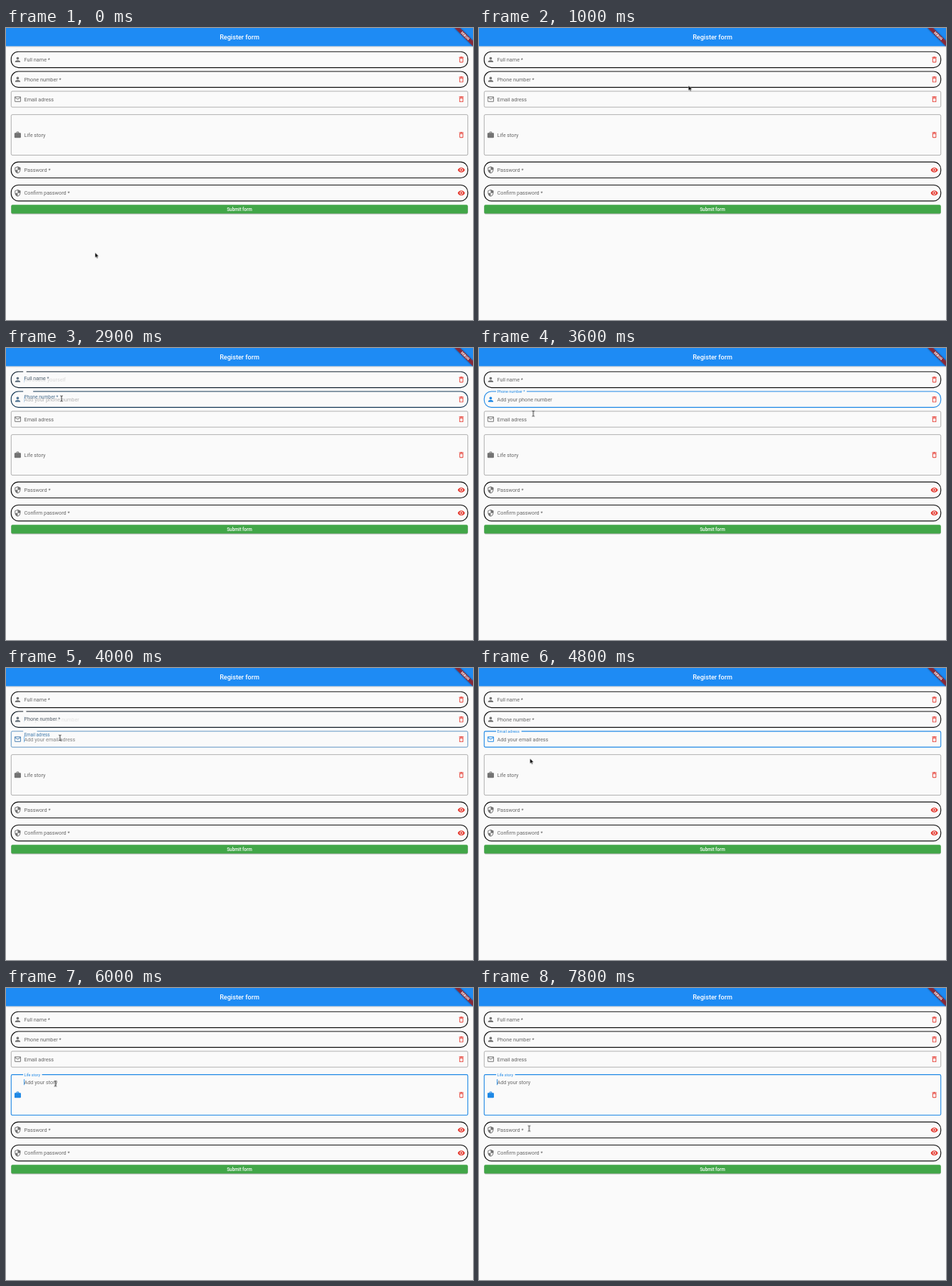
Animation, 656 px wide and 410 px high, one loop 8 s. Source, as an HTML page:

```html
<!DOCTYPE html>
<html lang="en">
<head>
<meta charset="utf-8">
<title>Register form</title>
<style>
@property --f { syntax: '<number>'; inherits: true; initial-value: 0; }
@property --arrow { syntax: '<number>'; inherits: true; initial-value: 1; }

:root { --blue: #1e88e5; --loop: 8s; }
html, body { margin: 0; width: 100%; height: 100%; overflow: hidden; background: #fafafa; }
svg { display: block; width: 100%; height: 100%; }
text { font-family: Roboto, Arial, sans-serif; font-size: 16px; }

.bar { fill: #1e8bf4; filter: drop-shadow(0 1px 2px rgba(0, 0, 0, .25)); }
.title { font-size: 20px; font-weight: 500; fill: #fff; }
.button { fill: #41a648; filter: drop-shadow(0 2px 1.5px rgba(0, 0, 0, .3)); }
.action { font-size: 14px; font-weight: 500; fill: #fff; }
.mid { text-anchor: middle; }
.ribbon-shadow { fill: rgba(0, 0, 0, .5); filter: blur(2.5px); }
.ribbon { fill: rgba(183, 28, 28, .7); }
.ribbon-text { font-size: 10.2px; font-weight: 900; fill: #fff; }

/* --f runs from 0 (resting) to 1 (focused) */
.field { animation: var(--loop) cubic-bezier(.4, 0, .2, 1) infinite; }
.name { animation-name: name; }
.phone { animation-name: phone; }
.email { animation-name: email; }
.story { animation-name: story; }

.box {
  fill: none;
  stroke: color-mix(in srgb, var(--blue) calc(var(--f) * 100%), var(--line));
  stroke-width: calc(var(--w) + var(--f) * (2.4px - var(--w)));
}
.notch { fill: #fafafa; transform: scaleX(var(--f)); }
.icon { fill: color-mix(in srgb, var(--blue) calc(var(--f) * 100%), #737373); }
.tool { fill: #e5392f; }
.label {
  fill: color-mix(in srgb, var(--blue) calc(var(--f) * 100%), #666);
  transform: translateY(calc(var(--f) * var(--rise))) scale(calc(1 - .25 * var(--f)));
}
.hint { fill: #6b6b6b; opacity: calc(var(--f) * 1.5); }
.caret { fill: var(--blue); animation: blink 1s ease-out var(--phase) infinite; }

@keyframes blink { 0%, 75%, 100% { opacity: 1; } 25%, 50% { opacity: 0; } }
@keyframes name { 0%, 17.25% { --f: 0; } 19.75%, 34.84% { --f: 1; } 37.34%, 100% { --f: 0; } }
@keyframes phone { 0%, 35.55% { --f: 0; } 38.05%, 48.43% { --f: 1; } 50.93%, 100% { --f: 0; } }
@keyframes email { 0%, 49.09% { --f: 0; } 51.59%, 66.63% { --f: 1; } 69.13%, 100% { --f: 0; } }
@keyframes story { 0%, 67.38% { --f: 0; } 69.88%, 100% { --f: 1; } }

.pointer {
  animation: move var(--loop) linear infinite, shape var(--loop) step-end infinite;
}
.arrow { stroke: #fff; stroke-width: 1; opacity: var(--arrow); }
.beam { fill: none; stroke: #222; stroke-width: .9; opacity: calc(1 - var(--arrow)); }

@keyframes move {
  0% { transform: translate(125.4px, 317px); }
  1.25% { transform: translate(104px, 153px); }
  2.5%, 5% { transform: translate(86px, 44px); }
  7.5% { transform: translate(500px, 60px); }
  9.5% { transform: translate(639px, 139px); }
  12% { transform: translate(350px, 90px); }
  14.5%, 24.5% { transform: translate(78px, 45px); }
  30%, 41.5% { transform: translate(78px, 71px); }
  46%, 57.5% { transform: translate(75.8px, 98px); }
  60% { transform: translate(71.6px, 127px); }
  65%, 74.5% { transform: translate(69.5px, 133.5px); }
  78.5%, 82% { transform: translate(69.5px, 139px); }
  92.5%, 100% { transform: translate(70.5px, 197.3px); }
}
@keyframes shape {
  0%, 6%, 58.5%, 86.5% { --arrow: 1; }
  2.4%, 14%, 62%, 89%, 100% { --arrow: 0; }
}
</style>
</head>
<body>
<svg viewBox="0 0 1440 900">
  <rect class="bar" width="1440" height="56"/>
  <text class="title mid" x="720" y="35.5">Register form</text>
  <g id="form"></g>
  <rect class="button" x="16" y="545" width="1408" height="27" rx="4"/>
  <text class="action mid" x="720" y="563.5">Submit form</text>
  <g transform="translate(1440 0) rotate(45)">
    <rect class="ribbon-shadow" x="-40" y="28" width="80" height="12"/>
    <rect class="ribbon" x="-40" y="28" width="80" height="12"/>
    <text class="ribbon-text mid" y="37.6">DEBUG</text>
  </g>
  <g transform="scale(2.19512)">
    <g class="pointer">
      <path class="arrow" transform="scale(.4556)" d="M0 0V16l3.7-3.6 2.3 5.5 2.6-1.1-2.3-5.4h5z"/>
      <path class="beam" d="M-1.7-3.9Q0-3.9 0-2.9V2.9Q0 3.9-1.7 3.9M1.7-3.9Q0-3.9 0-2.9M0 2.9Q0 3.9 1.7 3.9"/>
    </g>
  </g>
</svg>
<script>
const icons = {
  person: 'M12 12c2.21 0 4-1.79 4-4s-1.79-4-4-4-4 1.79-4 4 1.79 4 4 4zm0 2c-2.67 0-8 1.34-8 4v2h16v-2c0-2.66-5.33-4-8-4z',
  mail: 'M22 6c0-1.1-.9-2-2-2H4c-1.1 0-2 .9-2 2v12c0 1.1.9 2 2 2h16c1.1 0 2-.9 2-2V6zm-2 0l-8 5-8-5h16zm0 12H4V8l8 5 8-5v10z',
  work: 'M20 6h-4V4c0-1.11-.89-2-2-2h-4c-1.11 0-2 .89-2 2v2H4c-1.11 0-1.99.89-1.99 2L2 19c0 1.11.89 2 2 2h16c1.11 0 2-.89 2-2V8c0-1.11-.89-2-2-2zm-6 0h-4V4h4v2z',
  shield: 'M12 1L3 5v6c0 5.55 3.84 10.74 9 12 5.16-1.26 9-6.45 9-12V5l-9-4zm0 10.99h7c-.53 4.12-3.28 7.79-7 8.94V12H5V6.3l7-3.11v8.8z',
  bin: 'M6 19c0 1.1.9 2 2 2h8c1.1 0 2-.9 2-2V7H6v12zM8 9h8v10H8V9zm7.5-5l-1-1h-5l-1 1H5v2h14V4z',
  eye: 'M12 4.5C7 4.5 2.73 7.61 1 12c1.73 4.39 6 7.5 11 7.5s9.27-3.11 11-7.5c-1.73-4.39-6-7.5-11-7.5zM12 17c-2.76 0-5-2.24-5-5s2.24-5 5-5 5 2.24 5 5-2.24 5-5 5zm0-8c-1.66 0-3 1.34-3 3s1.34 3 3 3 3-1.34 3-3-1.34-3-3-3z'
};

const fields = [
  { id: 'name', top: 73, label: 'Full name *', hint: 'Introduce yourself', icon: 'person', round: true, notch: 66, phase: 900 },
  { id: 'phone', top: 134, label: 'Phone number *', hint: 'Add your phone number', icon: 'person', round: true, notch: 94, phase: 300 },
  { id: 'email', top: 195, label: 'Email adress', hint: 'Add your email adress', icon: 'mail', notch: 78, phase: 350 },
  { id: 'story', top: 267, height: 125, label: 'Life story', hint: 'Add your story', icon: 'work', notch: 58, phase: 990 },
  { id: 'secret', top: 413, label: 'Password *', icon: 'shield', tool: 'eye', round: true },
  { id: 'repeat', top: 484, label: 'Confirm password *', icon: 'shield', tool: 'eye', round: true }
];

const glyph = (name, cls, x, y) =>
  `<path class="${cls}" transform="translate(${x - 12} ${y - 12})" d="${icons[name]}"/>`;

function row({ id, top, height = 49, label, hint, icon, tool = 'bin', round, notch, phase }) {
  const mid = top + height / 2;
  const base = mid + 5.5;
  const hintBase = height > 49 ? top + 28.5 : base;
  const vars = `--line:${round ? '#111' : '#8c8c8c'};--w:${round ? 2.5 : 1.5}px;` +
    `--rise:${top + 4.5 - base}px;--phase:${(phase || 0) - 1000}ms`;
  const active = hint ? `
    <g transform="translate(53 ${top - 3})"><rect class="notch" width="${notch}" height="6"/></g>
    <g class="hint"><text x="56" y="${hintBase}">${hint}</text>
      <rect class="caret" x="55" y="${hintBase - 14.5}" width="2" height="18"/></g>` : '';
  return `<g class="field ${id}" style="${vars}">
    <rect class="box" x="16" y="${top}" width="1408" height="${height}" rx="${round ? 22 : 4}"/>
    ${active}
    ${glyph(icon, 'icon', 36, mid)}${glyph(tool, 'tool', 1404, mid)}
    <g transform="translate(56 ${base})"><text class="label">${label}</text></g>
  </g>`;
}

document.getElementById('form').innerHTML = fields.map(row).join('');
</script>
</body>
</html>
```
